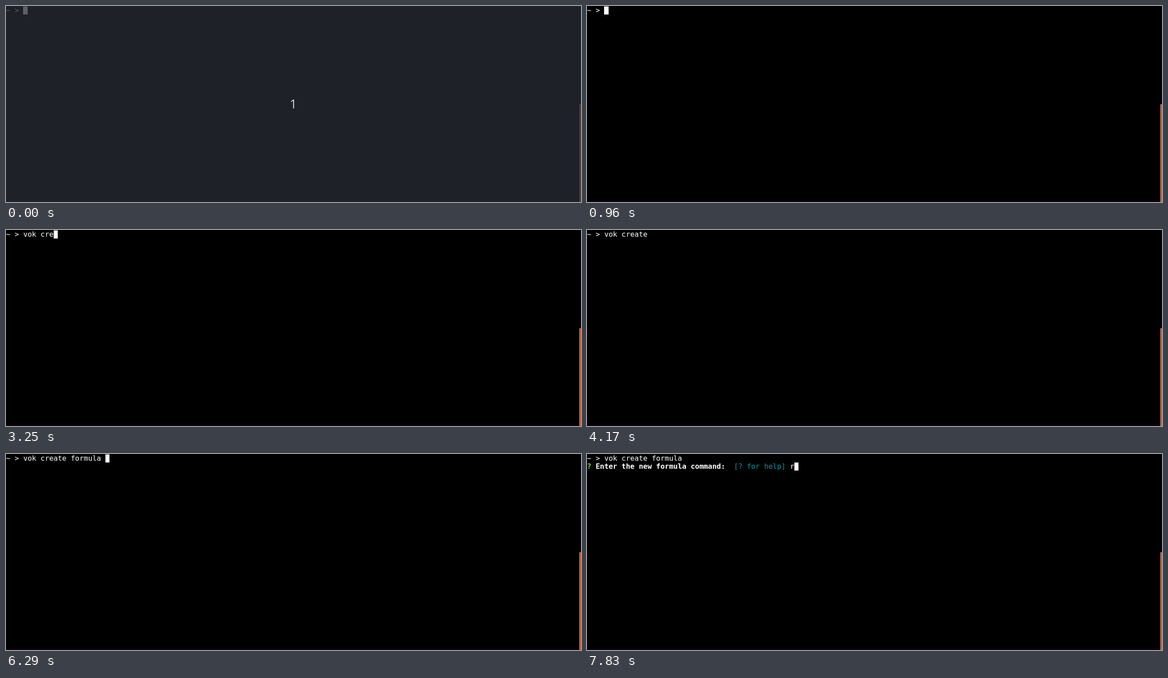
An HTML page for the animation above (8000 ms loop, 1278 px wide and 438 px high).

```html
<!DOCTYPE html>
<html lang="en">
<head>
<meta charset="utf-8">
<title>Terminal session</title>
<style>
  html, body { margin: 0; width: 100%; height: 100%; overflow: hidden; background: #000; }
  svg { display: block; }
  text { white-space: pre; fill: #fff; }
  .term { font: 16px "DejaVu Sans Mono", monospace; letter-spacing: -0.032px; }
  .bold { font-weight: bold; }
  .green { fill: #8ae234; }
  .teal { fill: #06989a; }
  #count { font: 28px "Open Sans", sans-serif; fill: #cdd2db; text-anchor: middle; }
</style>
</head>
<body>
<svg width="1278" height="438" viewBox="0 0 1278 438">
  <rect width="1278" height="438"/>
  <rect y="434" width="1278" height="4" fill="#0c0209"/>
  <rect x="1274" y="219.5" width="4" height="218.5" fill="#bd5d3a"/>
  <g class="term">
    <text id="command" y="15"></text>
    <text id="question" y="33"><tspan class="bold green">?</tspan><tspan class="bold"> Enter the new formula command:</tspan><tspan class="teal">  [? for help]</tspan> <tspan id="answer"></tspan></text>
  </g>
  <rect id="cursor" height="18" fill="#fff"/>
  <g id="cover">
    <rect width="1278" height="438" fill="#282c34" opacity="0.75"/>
    <text id="count" x="638.5" y="229">1</text>
  </g>
</svg>
<script>
const LOOP = 8000;
const CELL = 9.6;
const ROW = 18;
const PROMPT = "~ > ";
const COMMAND = "vok create formula ";
const ANSWER = "r";
const ANSWER_COLUMN = 47;

// Number of command characters present from each moment on.
const typing = [
  [0, 0], [1420, 1], [2000, 2], [2080, 3], [2500, 4], [3000, 5],
  [3040, 6], [3250, 7], [4000, 11], [4920, 13], [5170, 19]
];
const cursorOff = [[330, 960], [4170, 4630], [5710, 6290], [6960, 7580]];
const COVER_END = 330, ENTER = 6330, QUESTION = 6420, REPLY = 7830;

const [command, question, answer, cursor, cover] =
  ["command", "question", "answer", "cursor", "cover"].map(id => document.getElementById(id));

const show = (node, visible) => node.setAttribute("visibility", visible ? "visible" : "hidden");

function cursorCell(t, typed) {
  if (t < ENTER) return [PROMPT.length + typed, 0];
  if (t < QUESTION) return [0, 1];
  return [ANSWER_COLUMN + (t < REPLY ? 0 : ANSWER.length), 1];
}

function draw(t) {
  const typed = typing.findLast(([start]) => t >= start)[1];
  const [column, row] = cursorCell(t, typed);
  const left = Math.round(column * CELL);

  command.textContent = PROMPT + COMMAND.slice(0, typed);
  answer.textContent = t < REPLY ? "" : ANSWER;
  cursor.setAttribute("x", left);
  cursor.setAttribute("y", 1 + row * ROW);
  cursor.setAttribute("width", Math.round((column + 1) * CELL) - left);

  show(cover, t < COVER_END);
  show(question, t >= QUESTION);
  show(cursor, !cursorOff.some(([from, to]) => t >= from && t < to));
}

const begin = performance.now();
function tick() {
  draw((performance.now() - begin) % LOOP);
  requestAnimationFrame(tick);
}
tick();
</script>
</body>
</html>
```
